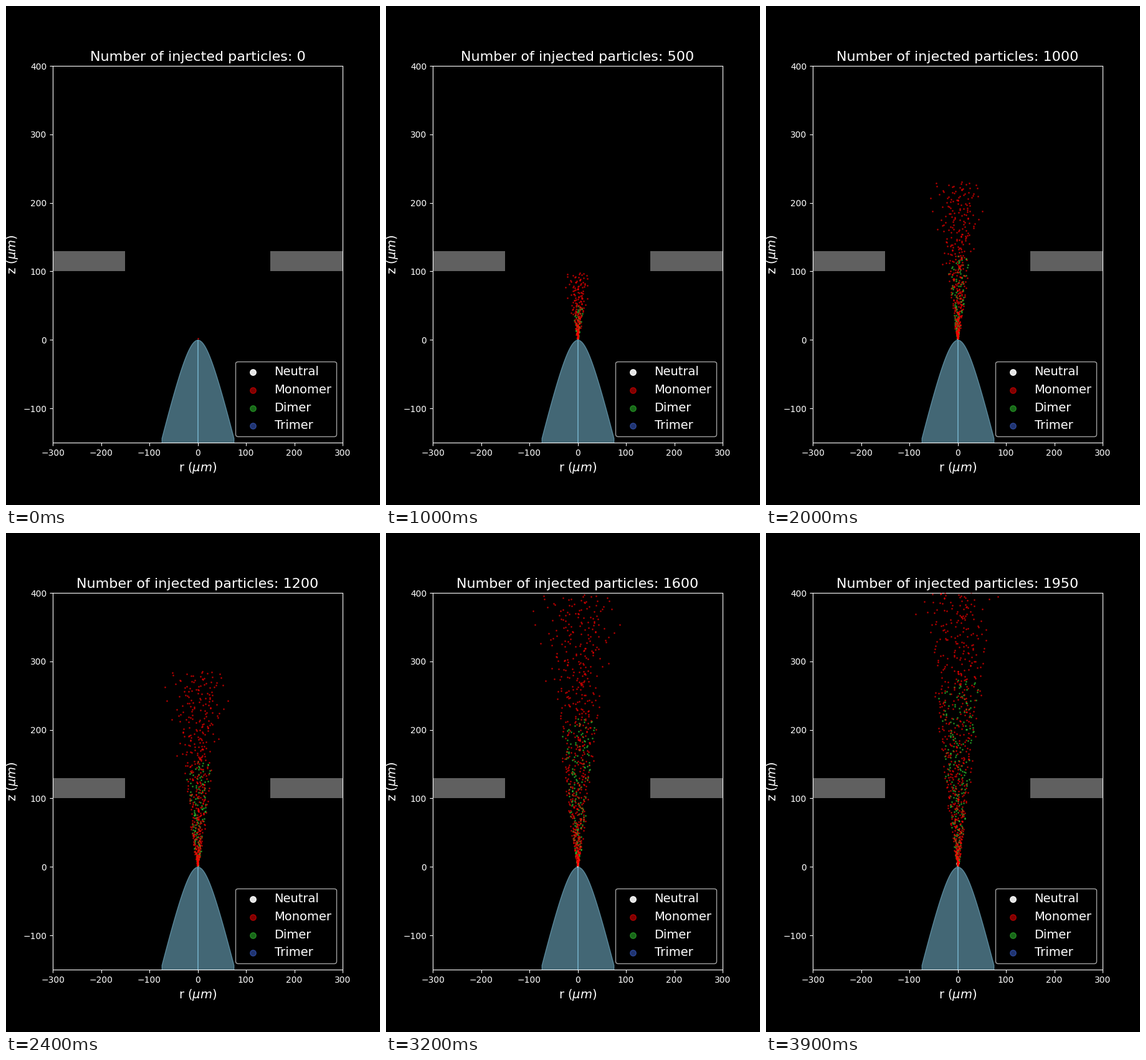
A matplotlib script that plays this animation: 600x800 px, repeating every 4000 ms.

```python
import numpy as np
import matplotlib.pyplot as plt
from matplotlib.animation import FuncAnimation

FRAMES, INTERVAL = 40, 100
PER_FRAME = 50

plt.style.use("dark_background")
rng = np.random.default_rng(7)


class Species:
    """Particles that accelerate from the tip to a terminal speed."""

    def __init__(self, ax, name, color, alpha, zorder, births, drift,
                 speed=0.0, lag=0.0, tau=1.0, z0=2.0):
        self.births, self.drift = births, drift
        self.speed, self.lag, self.tau, self.z0 = speed, lag, tau, z0
        self.dots = ax.scatter([], [], s=1.2, color=color, alpha=alpha,
                               label=name, zorder=zorder)

    def update(self, t):
        live = self.births <= t
        age = t - self.births[live]
        z = self.z0 + self.speed * age - self.lag * (1 - np.exp(-age / self.tau))
        self.dots.set_offsets(np.column_stack([self.drift[live] * age, z]))


def births(rate):
    """Evenly paced injection times, snapped to the particle counter."""
    n = int(FRAMES * rate)
    times = (np.arange(n) + rng.uniform(0, 0.9, n)) / rate
    times[0] = 0
    return np.floor(times * PER_FRAME) / PER_FRAME


def cone(n, reach):
    """Sideways speeds of a filled round beam seen from the side."""
    return reach * np.sqrt(rng.uniform(0, 1, n)) * np.cos(rng.uniform(0, np.pi, n))


fig, ax = plt.subplots(figsize=(6, 8), dpi=100)
fig.subplots_adjust(left=0.125, right=0.9, bottom=0.125, top=0.88)
ax.set_xlim(-300, 300)
ax.set_ylim(-150, 400)
ax.set_xlabel(r"r ($\mu m$)", fontsize=14)
ax.set_ylabel(r"z ($\mu m$)", fontsize=14)
title = ax.set_title("", fontsize=16)

# Extractor plates
for left in (-300, 150):
    ax.add_patch(plt.Rectangle((left, 100), 150, 30, color="#606060", lw=0))

# Emitter: two halves of a hyperboloid
r = np.linspace(0, 74.6, 120)
profile = -100 * (np.sqrt(1 + r ** 2 / 1130) - 1)
for side in (-1, 1):
    ax.fill_between(side * r, -160, profile, color="skyblue", alpha=0.5, lw=1)

mono_births = births(18)
mono_drift = cone(mono_births.size, 2.3)
strays = np.array([[1.7, -3.04], [3.1, -3.06], [3.15, 3.0], [4.0, 2.7],
                   [1.5, 2.3], [5.1, -2.85], [9.0, -2.9], [7.2, 2.6]])
mono_births = np.append(mono_births, strays[:, 0])
mono_drift = np.append(mono_drift, strays[:, 1])

dimer_births = births(6) + 0.1
dimer_drift = cone(dimer_births.size, 1.2)

neutral_births = births(0.4) + 1
neutral_drift = rng.normal(0, 0.03, neutral_births.size)

none = np.array([])
species = [
    Species(ax, "Neutral", "white", 0.9, 2, neutral_births, neutral_drift,
            speed=0.12, z0=1.5),
    Species(ax, "Monomer", "red", 0.5, 4, mono_births, mono_drift,
            speed=14, lag=53, tau=5.56),
    Species(ax, "Dimer", "limegreen", 0.5, 3, dimer_births, dimer_drift,
            speed=8, lag=41, tau=6.5),
    Species(ax, "Trimer", "royalblue", 0.5, 3, none, none),
]

legend = ax.legend(loc="lower right", fontsize=14)
for handle in legend.legend_handles:
    handle.set_sizes([47])


def draw(i):
    title.set_text(f"Number of injected particles: {i * PER_FRAME}")
    for kind in species:
        kind.update(i)
    return [title] + [kind.dots for kind in species]


anim = FuncAnimation(fig, draw, frames=FRAMES, interval=INTERVAL,
                     repeat=True, repeat_delay=0, blit=False)
plt.show()
```
